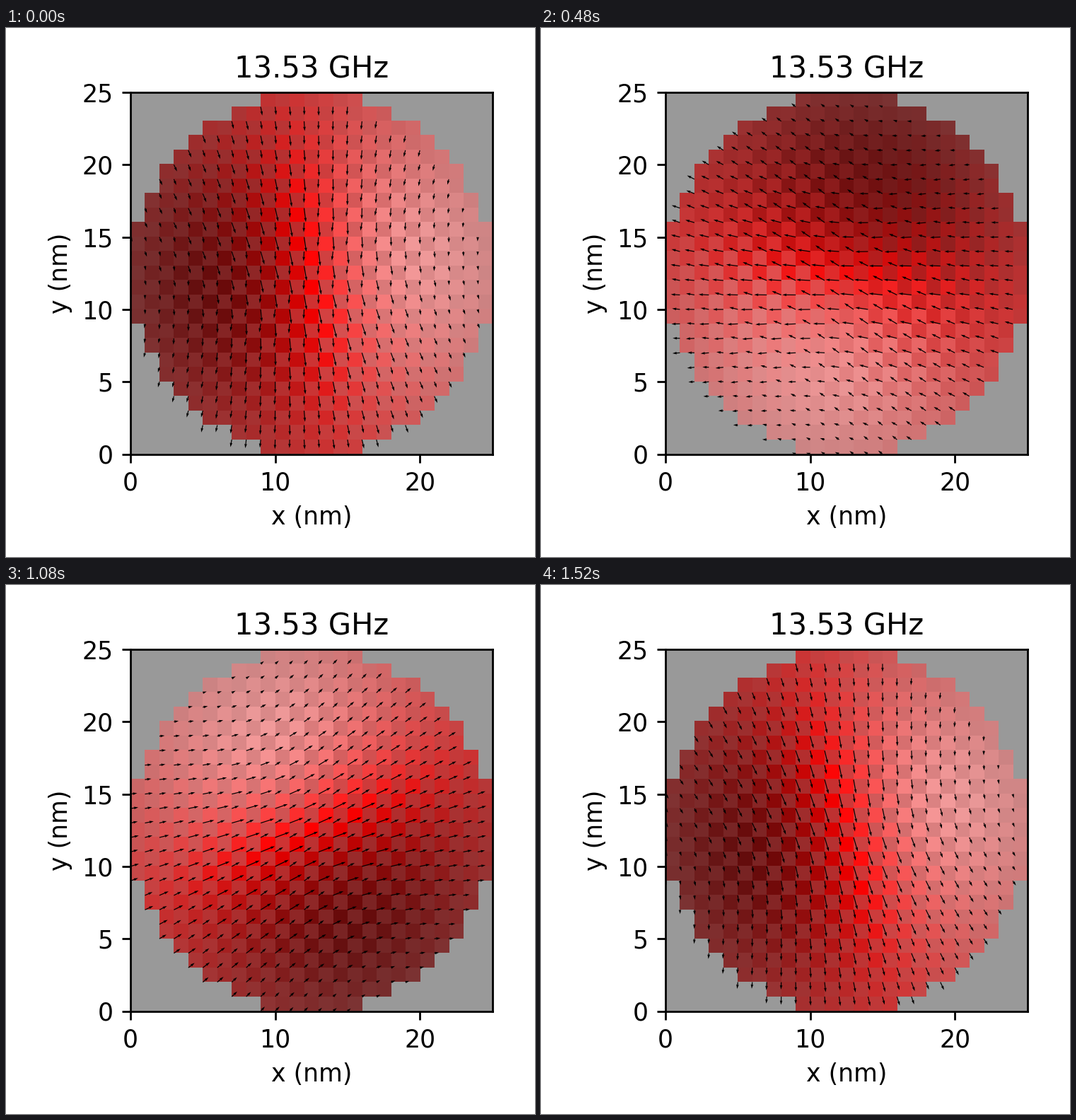
A matplotlib script that plays this animation: 748x748 px, repeating every 1560 ms.

```python
import numpy as np
import matplotlib.pyplot as plt
from matplotlib.animation import FuncAnimation

SIDE, DPI = 748, 250
FRAMES, INTERVAL = 39, 40
N = 25

cols, rows = np.meshgrid(np.arange(N), np.arange(N))
dx, dy = cols - 12, rows - 12
disc = dx**2 + dy**2 <= 12.5**2
r = np.hypot(dx, dy)
phi = np.arctan2(dy, dx)
odd = (cols + rows) % 2 == 1

# Radial profiles: in-plane part, quadrupole share, out-of-plane part
inplane = 1 / (1 + (r / 10.8)**2)
quad = 0.35 * r / 12
outplane = 0.56 * (r / 7) * np.exp(0.5 * (1 - (r / 7)**2))

# The two sublattices precess on crossed ellipses that round off outwards
minor = 0.58 + 0.32 * (r / 12)**2
amp_a = np.where(odd, 1, minor)
amp_b = np.where(odd, minor, 1)
START, AXIS = np.radians(5), np.radians(18)


def field(i):
    tau = START - 2 * np.pi * i / FRAMES - AXIS
    tilt = np.exp(1j * AXIS) * (amp_a * np.cos(tau) + 1j * amp_b * np.sin(tau))
    w = outplane * (tilt * np.exp(-1j * phi)).real
    m = -1j * tilt
    mirrored = np.conj(m) * np.exp(2j * phi)
    m = inplane * (m + quad * mirrored)
    return m.real, m.imag, w


def colours(u, v, w):
    """Red of varying lightness (from w) and saturation (from the norm)."""
    light = np.clip(0.5 + 0.5 * w, 0, 1)
    sat = np.clip(np.sqrt(u**2 + v**2 + w**2), 0, 1)
    chroma = sat * (1 - np.abs(2 * light - 1)) / 2
    rgb = np.stack([light + chroma, light - chroma, light - chroma], axis=-1)
    rgb[~disc] = 0.6
    return rgb


plt.rcParams["font.family"] = "DejaVu Sans"
fig = plt.figure(figsize=(SIDE / DPI, SIDE / DPI), dpi=DPI, facecolor="white")
ax = fig.add_axes([176 / SIDE, 145.5 / SIDE, 511.5 / SIDE, 511.5 / SIDE])

u, v, w = field(0)
image = ax.imshow(colours(u, v, w), origin="lower", extent=(0, N, 0, N),
                  interpolation="nearest")
arrows = ax.quiver(cols[disc], rows[disc], u[disc], v[disc], color="black",
                   scale_units="xy", scale=0.95, width=0.0024)
ax.set(xlim=(0, N), ylim=(0, N), xticks=[0, 10, 20],
       yticks=range(0, N + 1, 5), xlabel="x (nm)", ylabel="y (nm)")
ax.set_title("13.53 GHz")


def draw(i):
    u, v, w = field(i)
    image.set_data(colours(u, v, w))
    arrows.set_UVC(u[disc], v[disc])
    return image, arrows


anim = FuncAnimation(fig, draw, frames=FRAMES, interval=INTERVAL,
                     repeat=True, repeat_delay=0)
plt.show()
```
